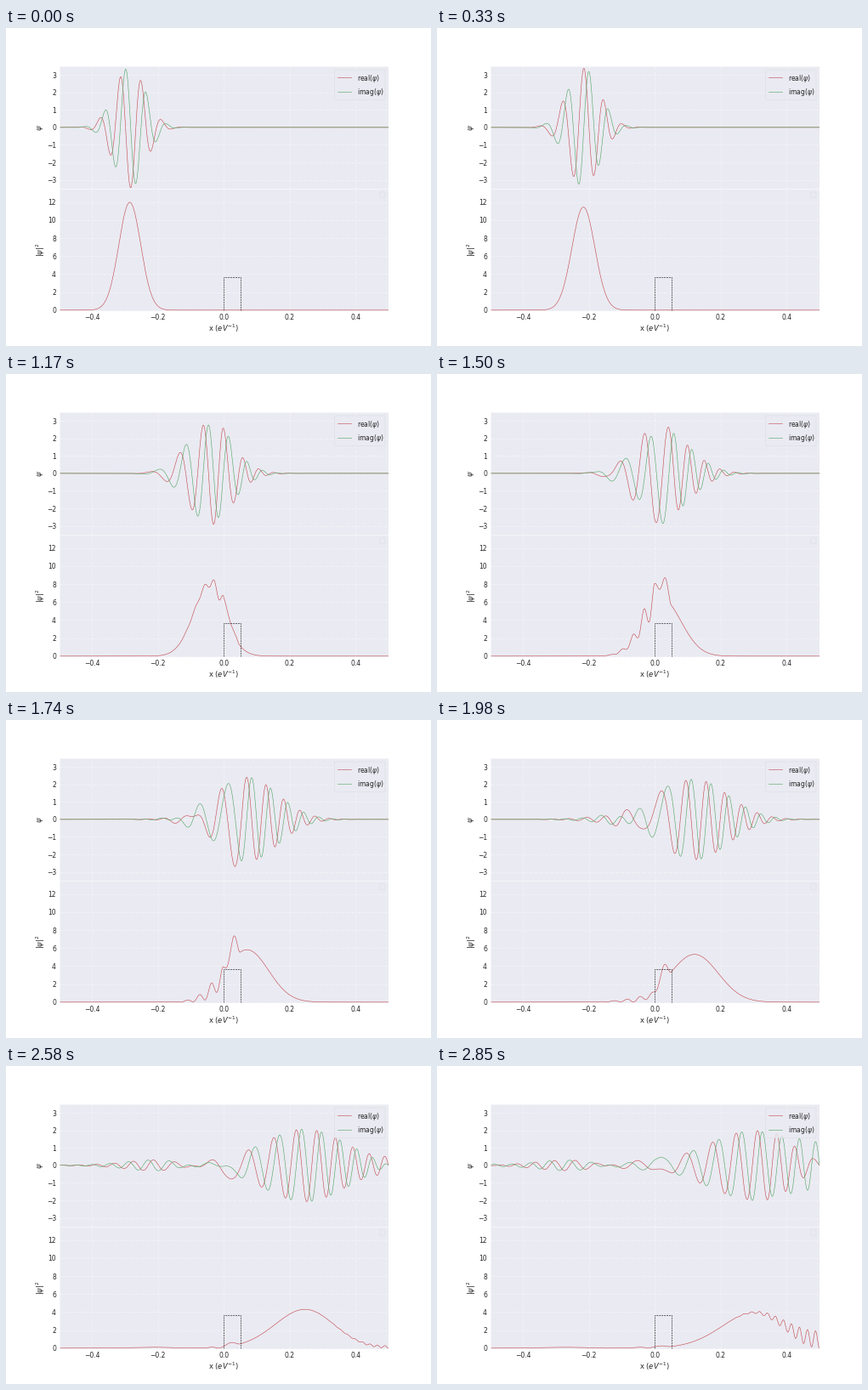
Animation of 500x374 px, one loop 2880 ms. Source, as a matplotlib script:

```python
import numpy as np
import matplotlib.pyplot as plt
from matplotlib.animation import FuncAnimation
from matplotlib.lines import Line2D
from matplotlib.patches import FancyBboxPatch
from matplotlib.transforms import Affine2D

W, H, DPI = 500, 374, 100
PX = 72 / DPI                      # points per pixel
FRAMES, INTERVAL = 96, 30

RED, GREEN, INK, PANEL = "#C44E52", "#55A868", "#262626", "#EAEAF2"

# Wave packet meeting a square barrier inside a hard-walled box
N = 800
K0, X0, SIGMA = 100, -0.2855, 0.0333
BARRIER, V0 = (0.0, 0.05), 1500
STEP = 6.27e-5                     # time per frame

x = np.linspace(-0.5, 0.5, N)
dx = x[1] - x[0]
inner = x[1:-1]
V = np.where((inner >= BARRIER[0]) & (inner <= BARRIER[1]), V0, 0.0)
hop = np.full(N - 3, -0.5 / dx**2)
hamiltonian = np.diag(1 / dx**2 + V) + np.diag(hop, 1) + np.diag(hop, -1)
energy, modes = np.linalg.eigh(hamiltonian)

packet = np.exp(-((inner - X0) / (2 * SIGMA)) ** 2 + 1j * K0 * inner)
packet /= np.sqrt(np.sum(np.abs(packet) ** 2) * dx)
weights = modes.T @ packet


def psi_at(frame):
    psi = np.zeros(N, complex)
    psi[1:-1] = modes @ (weights * np.exp(-1j * energy * frame * STEP))
    return psi


SMALL, LABEL, THIN = 7.7 * PX, 8.4 * PX, 0.6 * PX

plt.rcParams.update({
    "font.family": "DejaVu Sans",
    "mathtext.fontset": "dejavusans",
    "font.size": SMALL,
    "text.color": INK,
    "axes.labelcolor": INK,
    "axes.labelsize": LABEL,
    "axes.labelpad": 1.4 * PX,
    "axes.facecolor": PANEL,
    "axes.edgecolor": "white",
    "axes.linewidth": 0.5 * PX,
    "axes.axisbelow": True,
    "axes.grid": True,
    "grid.color": "white",
    "grid.linestyle": "-.",
    "grid.linewidth": 0.6 * PX,
    "grid.alpha": 0.6,
})

fig, (top, low) = plt.subplots(
    2, 1, sharex=True, figsize=(W / DPI, H / DPI), dpi=DPI, facecolor="white",
    gridspec_kw=dict(left=0.125, right=0.9, bottom=0.11, top=0.88, hspace=0))

for ax in (top, low):
    ax.tick_params(length=0, pad=3.5 * PX, labelsize=SMALL, labelcolor=INK)
top.tick_params(labelbottom=False)
top.set(xlim=(-0.5, 0.5), ylim=(-3.5, 3.5), ylabel=r"$\psi$",
        xticks=np.arange(-2, 3) * 0.2, yticks=range(-3, 4))
low.set(ylim=(-0.1, 13.5), yticks=range(0, 13, 2),
        xlabel=r"x ($eV^{-1}$)", ylabel=r"$|\psi|^2$")

real, = top.plot([], [], color=RED, lw=THIN)
imag, = top.plot([], [], color=GREEN, lw=THIN)
density, = low.plot([], [], color=RED, lw=THIN)
a, b = BARRIER
low.plot([a, a, b, b], [0, 3.63, 3.63, 0], "--", color="black", lw=0.55 * PX)

# Legends, laid out in pixels from the top left corner
pix = Affine2D().scale(1 / W, -1 / H).translate(0, 1) + fig.transFigure


def legend_box(left, upper, width, height):
    fig.add_artist(FancyBboxPatch(
        (left, upper), width, height, transform=pix, zorder=3,
        boxstyle="round,pad=0,rounding_size=1.6",
        fc=PANEL, ec="#DEDEE5", lw=0.8 * PX, alpha=0.8))


def legend_row(y, color, label):
    fig.add_artist(Line2D([390, 406], [y, y], color=color, lw=THIN,
                          transform=pix, zorder=4))
    fig.text(412.6, y + 3, label, transform=pix, size=SMALL,
             va="baseline", zorder=4)


legend_box(386.5, 49, 59.5, 35.5)
legend_row(58.5, RED, r"real($\psi$)")
legend_row(75.5, GREEN, r"imag($\psi$)")
legend_box(439.6, 192.9, 6.4, 6.4)


def update(frame):
    psi = psi_at(frame)
    real.set_data(x, psi.real)
    imag.set_data(x, psi.imag)
    density.set_data(x, np.abs(psi) ** 2)
    return real, imag, density


anim = FuncAnimation(fig, update, frames=FRAMES, interval=INTERVAL,
                     init_func=lambda: update(0), repeat=True, repeat_delay=0)
plt.show()
```
